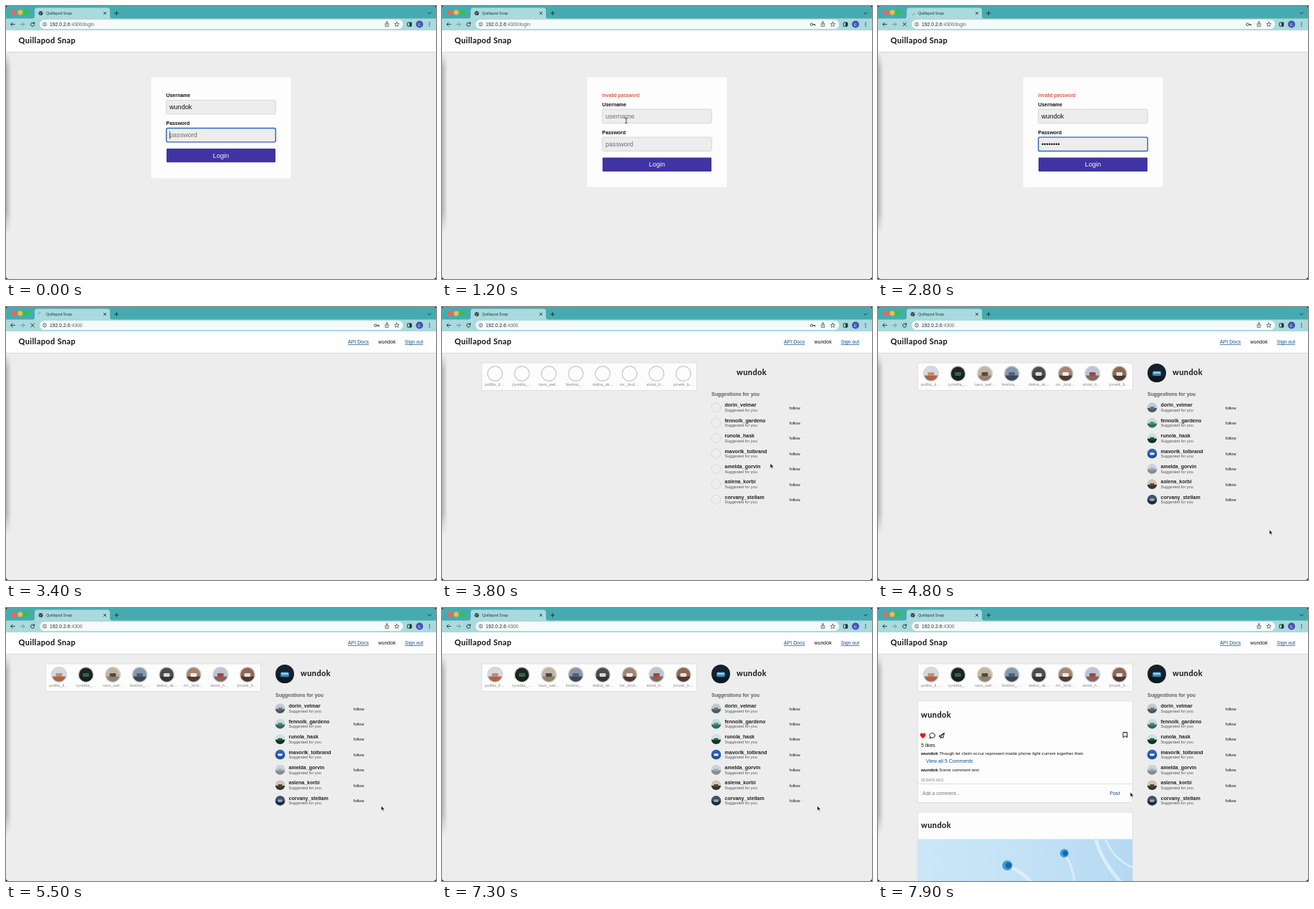
These frames come from a looping animation (600 px wide and 381 px high, 8000 ms). An HTML page:

```html
<!DOCTYPE html>
<html lang="en">
<head>
<meta charset="utf-8">
<title>Photo sharing demo</title>
<style>
  html, body { margin: 0; width: 100%; height: 100%; overflow: hidden; background: #000; }
  svg { display: block; width: 100%; height: 100%; font-family: "Liberation Sans", Arial, sans-serif; }
  .brand { font-family: Lato, sans-serif; font-weight: 700; letter-spacing: .38px; }
  .b { font-weight: 700; }
  .line { fill: none; stroke-linecap: round; stroke-linejoin: round; }
</style>
</head>
<body>
<svg id="stage" viewBox="0 0 600 381" xmlns="http://www.w3.org/2000/svg"></svg>
<script>
const LOOP = 8000, STEP = 100;
const SITE = "Quillapod Snap", USER = "wundok", HOST = "192.0.2.6";
const LINK = "#14508f";

const text = (x, y, size, fill, str, attrs = "") =>
  `<text x="${x}" y="${y}" font-size="${size}" fill="${fill}" ${attrs}>${str}</text>`;
const rect = (x, y, w, h, fill, attrs = "") =>
  `<rect x="${x}" y="${y}" width="${w}" height="${h}" fill="${fill}" ${attrs}/>`;
const circle = (x, y, r, fill, attrs = "") =>
  `<circle cx="${x}" cy="${y}" r="${r}" fill="${fill}" ${attrs}/>`;
const line = (d, color = "#23393b", width = 1, attrs = "") =>
  `<path class="line" d="${d}" stroke="${color}" stroke-width="${width}" ${attrs}/>`;
const group = (id, body, attrs = "") => `<g id="${id}" ${attrs}>${body}</g>`;
const brand = (x, y, size, str) => text(x, y, size, "#111", str, 'class="brand"');

function chrome() {
  const lights = ["#fe5f57", "#febc2e", "#28c840"]
    .map((c, i) => circle(11.2 + i * 8.7, 9, 3.4, c)).join("");
  const dots = [-2.4, 0, 2.4].map(d => circle(591, 25.6 + d, .75, "#23393b")).join("");
  return rect(0, 0, 600, 18, "#46abb0") + lights +
    `<path d="M36 18Q40 18 40 14V6Q40 2.500 43.500 2.500H141.500Q145 2.500 145 6V14Q145 18 149 18Z" fill="#a9dadd"/>` +
    rect(0, 17.5, 600, 16.5, "#a9dadd") +
    group("globe", circle(48.5, 10, 3, "#2f3537") +
      line("M46.700 9L48.300 10.200L47.700 12M49.300 7.800L50.500 9.500", "#b9dfe1", .8)) +
    group("spinner", line("M0-2.600A2.600 2.600 0 0 1 2.600 0", "#6c8f92", .8)) +
    text(56, 12, 5.3, "#24393b", SITE) +
    line("M136.300 8.300L139.700 11.700M139.700 8.300L136.300 11.700", "#23393b", .9) +
    line("M151.700 10H156.900M154.300 7.400V12.600", "#173c3e", 1) +
    line("M588.800 9L591 11.200L593.200 9", "#173c3e", 1) +
    line("M12.300 25.500H6.700M9.200 23L6.700 25.500L9.200 28", "#2a4345", 1) +
    line("M20.200 25.500H25.800M23.300 23L25.800 25.500L23.300 28", "#71999c", 1) +
    group("reload", line("M39.300 24.300A2.600 2.600 0 1 0 39.600 26.300M39.600 22.700V24.600H37.700")) +
    group("stop", line("M34.800 23.200L39.400 27.800M39.400 23.200L34.800 27.800")) +
    rect(47, 19, 507, 13, "#f5fbfb", 'rx="6.5"') +
    circle(54, 25.5, 2.5, "none", 'stroke="#555" stroke-width=".8"') +
    line("M54 25.300V26.700M54 24.100V24.200", "#555", .8) +
    `<text x="61" y="28" font-size="6.850" fill="#222">${HOST}<tspan fill="#666">:4300<tspan id="path">/login</tspan></tspan></text>` +
    group("pill", rect(510, 20, 14.5, 11, "#ced5d6", 'rx="5.5"')) +
    group("key", circle(515.6, 25.7, 1.7, "none", 'stroke="#444" stroke-width="1"') +
      line("M517.400 25.700H520.600V27M519.200 25.700V26.700", "#444", 1)) +
    line("M530.300 24.400H529.200V28.400H533.800V24.400H532.700M531.500 26.600V21.900M530.200 23L531.500 21.800L532.800 23", "#555", .8) +
    line("M545.300 22.300L546.200 24.500L548.500 24.700L546.700 26.200L547.300 28.500L545.300 27.200L543.300 28.500L543.900 26.200L542.100 24.700L544.400 24.500Z", "#555", .8) +
    rect(560.2, 23, 5.6, 5.2, "none", 'rx=".6" stroke="#1e3436" stroke-width="1"') +
    rect(563, 23, 3, 5.2, "#1e3436") +
    circle(577, 25.5, 5, "#4650b4") +
    text(577, 27.6, 5.8, "#e8e9fa", "E", 'text-anchor="middle"') + dots;
}

function header() {
  return rect(0, 64, 600, 1.2, "#dcdcdc") + rect(0, 34, 600, 29.8, "#fefefe") +
    brand(17.5, 52, 11, SITE) +
    group("nav",
      text(477, 51, 7, LINK, "API Docs", 'text-decoration="underline"') +
      text(519.5, 51, 7, "#111", USER) +
      text(556.5, 51, 7, LINK, "Sign out", 'text-decoration="underline"'));
}

function field(id, label, y, hint) {
  return text(223.5, y - 4, 6.95, "#111", label, 'class="b"') +
    rect(223.7, y + .5, 152.6, 19.4, "#ededed", `id="${id}Box" rx="1.8"`) +
    text(228, y + 13.2, 9.1, "#707070", hint, `id="${id}Text"`) +
    line(`M228.600 ${y + 5}V${y + 15}`, "#222", .7, `id="${id}Caret"`);
}

function login() {
  let dots = "";
  for (let i = 0; i < 8; i++) dots += circle(229.7 + i * 3.2, 180.2, 1.25, "#111", 'class="dot"');
  return rect(202, 99, 196, 142, "#fdfdfd", 'id="card" rx="2" stroke="#e6e6e6" stroke-width=".6"') +
    group("error", text(223.5, 127.2, 7, "#d62108", "Invalid password")) +
    group("form",
      field("user", "Username", 131, "username") +
      field("pass", "Password", 170, "password") + dots +
      rect(224, 199, 152, 19.3, "#4034a4", 'rx="1"') +
      text(300, 211.9, 9.1, "#f6f5fd", "Login", 'text-anchor="middle"'));
}

// Circle split into an upper and lower tone, with one accent block.
function avatar(x, y, r, [sky, ground, accent], ratio = .1) {
  const h = r * ratio, w = Math.sqrt(r * r - h * h);
  return `<g transform="translate(${x} ${y})">` + circle(0, 0, r, sky) +
    `<path d="M${-w} ${h}A${r} ${r} 0 0 0 ${w} ${h}Z" fill="${ground}"/>` +
    rect(-r * .45, -r * .2, r * .9, r * .5, accent, `rx="${r * .12}"`) + "</g>";
}

const stories = [
  ["pollitu_li…", "#d3d9e2 #a9654b #c98a62"],
  ["cyrelda_…", "#202422 #1b1e1c #2c6b4a"],
  ["tavo_wel…", "#c2b5a3 #94826e #514b45"],
  ["brelina_…", "#8799ad #39475a #56606e"],
  ["delna_sk…", "#4b4c4b #353635 #d8dad6"],
  ["mr._brol…", "#a58470 #4d3b33 #eeeae4"],
  ["alvist_h…", "#b9c5d4 #83655f #a3463f"],
  ["jorvek_b…", "#8d6753 #4b3a34 #e4dfda"]
].map(([name, tones]) => [name, tones.split(" ")]);

const people = [
  ["dorin_velmar", "#c0c9d1 #4c5a68 #6b7885"],
  ["fennolk_gardeno", "#c5dcda #2f6b62 #4f8980"],
  ["runola_hask", "#cfe2df #143029 #1d5a4e"],
  ["mavorik_tolbrand", "#2d62b4 #24529c #dfe8f4"],
  ["amelda_gorvin", "#c8d3de #858c90 #a6a8a8"],
  ["aslena_korbi", "#cfc7b5 #3a342b #554b3d"],
  ["corvany_stellam", "#41526c #202c3a #9aa7b8"]
].map(([name, tones]) => [name, tones.split(" ")]);

const storyX = i => 74 + i * 37.55;
const rowY = i => 140.3 + i * 21.4;

function feed() {
  const ring = (x, y, r, w) => circle(x, y, r, "none", `stroke="#cfcfcf" stroke-width="${w}"`);
  let base = rect(55.3, 78, 300, 38.5, "#fdfdfd", 'stroke="#d6d6d6" stroke-width=".7"');
  let photos = "";
  stories.forEach(([name, tones], i) => {
    const x = storyX(i);
    base += ring(x, 93, 10.3, 1.4) + text(x - 14, 110.3, 5.9, "#8a8a8a", name);
    photos += avatar(x, 93, 9.7, tones, .25);
  });
  base += brand(411, 95.2, 11, USER) +
    text(376, 123.5, 6.95, "#5a5a5a", "Suggestions for you", 'class="b"');
  let faces = avatar(389, 92, 13, ["#15212b", "#11181f", "#2d90c6"], .4) +
    rect(384, 90.5, 10, 2.4, "#a7cfe0");
  people.forEach(([name, tones], i) => {
    const y = rowY(i);
    base += ring(382.5, y, 6.4, .7) +
      text(394.5, y - .9, 7.05, "#222", name, 'class="b"') +
      text(394.5, y + 5.6, 5.58, "#555", "Suggested for you") +
      text(484.8, y + 2.2, 5.8, "#111", "follow");
    faces += avatar(382.5, y, 6.8, tones);
  });
  return base + group("photos", photos) + group("faces", faces);
}

function posts() {
  const box = 'stroke="#d6d6d6" stroke-width=".7"';
  const comment = (y, str) =>
    `<text x="60" y="${y}" font-size="6.250" fill="#111"><tspan class="b">${USER}</tspan> ${str}</text>`;
  const bloom = (x, y, r) => circle(x, y, r, "#3d9fd8") + circle(x + r * .2, y, r * .6, "#1767ab");
  return rect(55.3, 130, 300, 141.3, "#fdfdfd", box) + brand(60, 153, 11, USER) +
    `<path d="M62.600 182.200L59.300 178.700C57.500 176.500 60.300 172.800 62.600 175.600C64.900 172.800 67.700 176.500 65.900 178.700Z" fill="#f5101c"/>` +
    line("M72.300 181.800L73 179.900C70.300 176.600 73.500 174.700 75.700 174.700C81 174.900 80.500 180.900 75.800 181.100L74.300 180.900Z", "#111", 1) +
    line("M85.200 178.800L92.300 174.600L91 181.200L88.600 180.200L87.400 182V179.600ZM87.400 179.600L92.300 174.600", "#111", 1) +
    line("M342.400 173.500H347.600V180.700L345 178.500L342.400 180.700Z", "#111", 1) +
    text(60, 193.5, 7, "#111", "5 likes") +
    comment(204.8, "Though let claim occur represent inside phone light current together their.") +
    text(67, 216.2, 7, LINK, "View all 5 Comments") +
    comment(228, "Some comment text") +
    text(60, 241.8, 4.85, "#777", "30 DAYS AGO") +
    rect(55.3, 245.1, 300, .8, "#dadada") +
    text(62, 260.6, 6.65, "#757575", "Add a comment...") +
    text(323.2, 260.6, 7.1, LINK, "Post") +
    rect(55.3, 285, 300, 110, "#fdfdfd", box) + brand(60, 307.4, 11, USER) +
    rect(55.7, 322.5, 299.3, 60, "url(#sky)") +
    line("M181 360Q205 370 214 384M304 322Q311 352 340 384", "#e4f2fb", 5, 'opacity=".8"') +
    line("M260 343Q273 361 274 384M317 322Q328 350 355 362", "#e4f2fb", 3, 'opacity=".7"') +
    bloom(180.5, 359.3, 7) + bloom(260, 342.3, 6);
}

const defs = `<defs>
  <clipPath id="window"><rect width="600" height="381" rx="4"/></clipPath>
  <linearGradient id="edge"><stop stop-color="#000" stop-opacity=".24"/><stop offset="1" stop-color="#000" stop-opacity="0"/></linearGradient>
  <linearGradient id="sky"><stop stop-color="#cbe6f7"/><stop offset=".5" stop-color="#c3e2f6"/><stop offset="1" stop-color="#b5d9f2"/></linearGradient>
  <linearGradient id="fade" x2="0" y2="1"><stop stop-color="#000"/><stop offset=".08" stop-color="#fff"/><stop offset=".88" stop-color="#fff"/><stop offset="1" stop-color="#000"/></linearGradient>
  <mask id="soft"><rect y="66" width="9" height="252" fill="url(#fade)"/></mask></defs>`;

const stage = document.getElementById("stage");
stage.innerHTML = defs + `<g clip-path="url(#window)">` + rect(0, 0, 600, 381, "#ededed") +
  chrome() + header() +
  rect(0, 66, 8, 252, "url(#edge)", 'mask="url(#soft)"') +
  group("login", login()) + group("feed", feed()) + group("posts", posts()) +
  group("beam", line("M-1.300-3.500Q0-3.500 0-2.500V2.500Q0 3.500-1.300 3.500M1.300-3.500Q0-3.500 0-2.500M0 2.500Q0 3.500 1.300 3.500", "#222", .8)) +
  group("arrow", `<path d="M0 0V6.700L1.600 5.300L2.700 7.700L3.900 7.200L2.800 4.900H4.900Z" fill="#111" stroke="#fff" stroke-width=".6"/>`) +
  "</g>";

const el = {};
stage.querySelectorAll("[id]").forEach(n => { el[n.id] = n; });
const dots = [...stage.querySelectorAll(".dot")];

const show = (id, on) => { el[id].style.display = on ? "" : "none"; };
const within = (t, a, b) => t >= a && t < b;
const move = (id, [x, y]) => el[id].setAttribute("transform", `translate(${x} ${y})`);

// Keys are [time, x, y].
const beamPath = [[1000, 280, 192], [1200, 257, 160]];
const arrowPath = [[3600, 470, 236], [3800, 458, 218.3], [4300, 312, 148], [4600, 400, 300],
  [4850, 563, 312], [5100, 523.5, 276], [7500, 523.5, 276], [7900, 352, 257]];

function along(keys, t) {
  const next = keys.findIndex(k => k[0] > t);
  if (next < 0) return keys[keys.length - 1].slice(1);
  if (next === 0) return keys[0].slice(1);
  const a = keys[next - 1], b = keys[next];
  let p = (t - a[0]) / (b[0] - a[0]);
  p = p * p * (3 - 2 * p);
  return [a[1] + (b[1] - a[1]) * p, a[2] + (b[2] - a[2]) * p];
}

function passLength(t) {
  if (t < 900) return Math.round(Math.min(t / 500, 1) * 8);
  if (t < 2300) return Math.max(0, Math.min((t - 1800) / 100, 3));
  return t < 2400 ? 5 : 8;
}

function userLength(t) {
  if (t < 900) return USER.length;
  return Math.round(Math.max(0, Math.min((t - 1300) / 400, 1)) * USER.length);
}

function updateField(id, value, hint, focused, length) {
  const box = el[id + "Box"], label = el[id + "Text"];
  box.setAttribute("stroke", focused ? "#2c63c0" : "#c9c9c9");
  box.setAttribute("stroke-width", focused ? 1.4 : .7);
  label.textContent = length ? value : hint;
  label.setAttribute("fill", length ? "#111" : "#707070");
  show(id + "Caret", focused && !length);
}

function update(time) {
  const t = Math.floor((time % LOOP) / STEP) * STEP;
  const loading = within(t, 600, 900) || within(t, 2600, 3500);
  const failed = t >= 900, inside = t >= 3300;

  show("globe", !loading);
  show("spinner", loading);
  el.spinner.setAttribute("transform", `translate(48 10) rotate(${t * .9 + 90})`);
  show("reload", !loading);
  show("stop", loading);
  show("path", !inside);
  show("key", within(t, 1000, 4700));
  show("pill", within(t, 4100, 4700));

  show("nav", inside);
  show("login", !inside);
  show("error", failed);
  el.card.setAttribute("height", failed ? 154.3 : 142);
  move("form", [0, failed ? 12.6 : 0]);
  const typed = userLength(t), secret = passLength(t);
  updateField("user", USER.slice(0, typed), "username", within(t, 1300, 1800), typed);
  updateField("pass", "", "password", !failed || t >= 1800, secret);
  dots.forEach((d, i) => { d.style.display = i < secret ? "" : "none"; });

  show("feed", t >= 3500);
  show("photos", t >= 4000);
  show("faces", t >= 4100);
  show("posts", t >= 7500);

  show("beam", within(t, 1000, 1400));
  move("beam", along(beamPath, t));
  show("arrow", t >= 3600);
  move("arrow", along(arrowPath, t));
}

const start = performance.now();
function tick() {
  update(performance.now() - start);
  requestAnimationFrame(tick);
}
tick();
</script>
</body>
</html>
```
